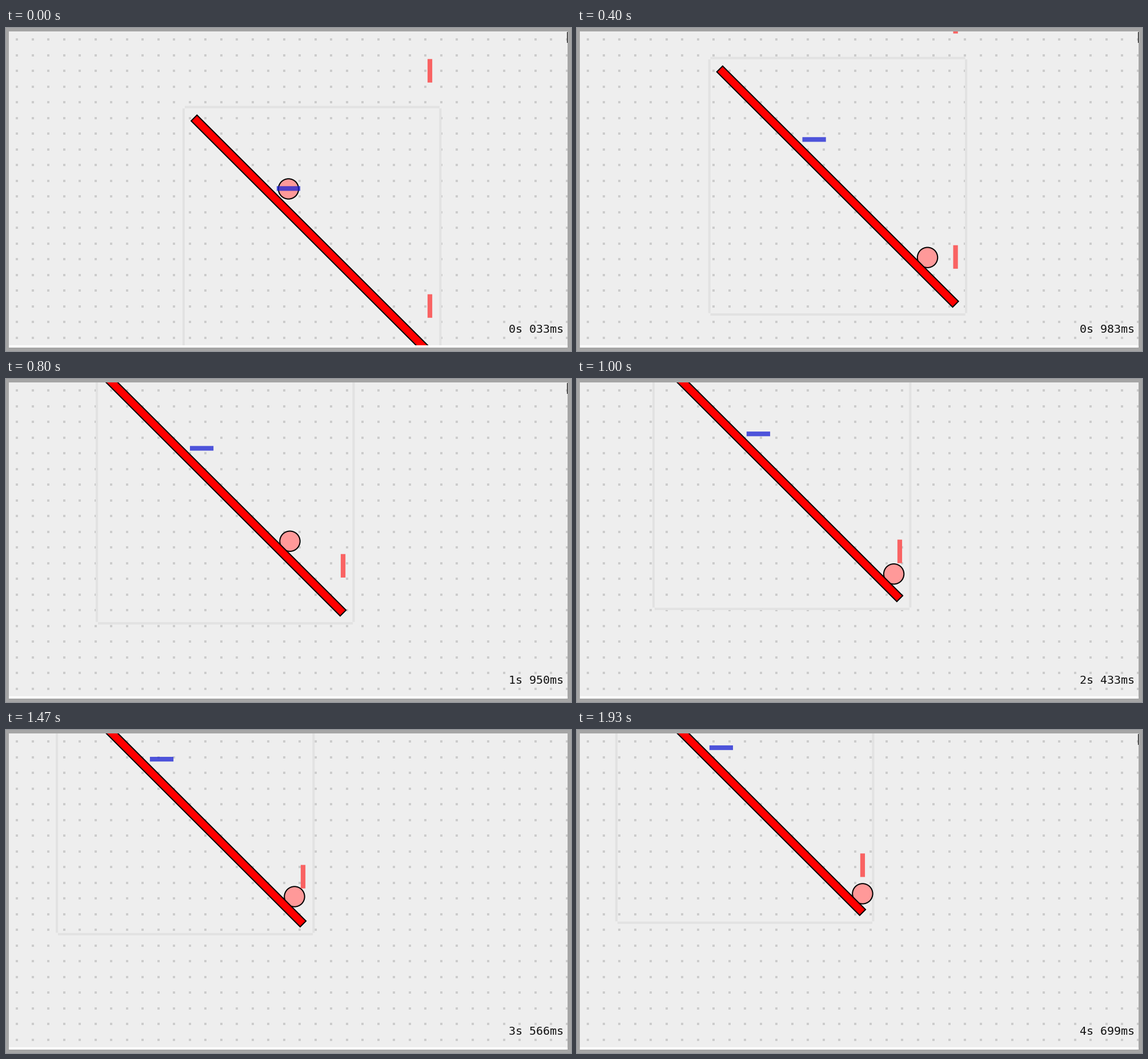
A matplotlib script for the animation above (2 s loop, 989 by 566 pixels).

```python
from math import sqrt

import numpy as np
import matplotlib.pyplot as plt
from matplotlib.animation import FuncAnimation
from matplotlib.patches import Circle, Polygon, Rectangle
from matplotlib.transforms import Affine2D

W, H, DPI = 989, 566, 64
PT = 72 / DPI                 # points per pixel

# Ball physics, in pixels and seconds
START = np.array([494.5, 281.5])
DROP = 8.2                    # free fall before touching the rail
TRAVEL = 247.5                # horizontal distance to the stop
HIT = 1.096                   # time of the first bounce
BOUNCE = 0.627
FOLLOW = 0.0295               # camera smoothing per tick
TICKS = 282

ACC = (2 * TRAVEL + DROP) / HIT**2
LAND = sqrt(DROP / ACC)


def roll(t):
    """Horizontal distance rolled along the rail."""
    if t < LAND:
        return 0.0
    if t < HIT:
        return (ACC * t * t - DROP) / 2
    t -= HIT
    speed = ACC * HIT * BOUNCE
    while speed > 1 and t > 2 * speed / ACC:
        t -= 2 * speed / ACC
        speed *= BOUNCE
    if speed <= 1:
        return TRAVEL
    return TRAVEL - speed * t + ACC * t * t / 2


def simulate():
    balls, cams = [], []
    cam = np.zeros(2)
    for n in range(TICKS + 1):
        t = n / 60
        x = roll(t)
        ball = np.array([x, x + min(DROP, ACC * t * t)])
        cam = cam + FOLLOW * (ball - cam)
        balls.append(START + ball)
        cams.append(cam)
    return balls, cams


balls, cams = simulate()

fig = plt.figure(figsize=(W / DPI, H / DPI), dpi=DPI, facecolor="#eeeeee")
ax = fig.add_axes([0, 0, 1, 1])
ax.set_xlim(0, W)
ax.set_ylim(H, 0)
ax.axis("off")

camera = Affine2D()
world = camera + ax.transData


def box(x0, y0, x1, y1, color, z, **kw):
    patch = Rectangle((x0, y0), x1 - x0, y1 - y0, fc=color, lw=0, zorder=z, **kw)
    return ax.add_patch(patch)


def moving_box(x0, y0, x1, y1, color, z, **kw):
    return box(x0, y0, x1, y1, color, z, transform=world, snap=False, **kw)


# Dotted grid
gx, gy = np.meshgrid(19 + 27.5 * np.arange(36), 20 + 27.5 * np.arange(20))
ax.plot(gx.ravel(), gy.ravel(), ls="", marker="s", ms=3.7 * PT, mew=0,
        color="#cccccc", zorder=1)

# Room walls
for x in (309, 758.4):
    moving_box(x, 141, x + 4, 585.5, "#e2e2e2", 2)
for y in (136.6, 586):
    moving_box(313, y, 759, y + 4, "#e2e2e2", 2)

ball = Circle(START, 17.7, fc="#ff9999", ec="black", lw=2 * PT,
              transform=world, zorder=3)
ax.add_patch(ball)

# Rail
a, b = np.array([329.2, 157.7]), np.array([742, 570])
side = np.array([5.1, -5.1])
ax.add_patch(Polygon([a + side, b + side, b - side, a - side], fc="red",
                     ec="black", lw=2 * PT, joinstyle="miter",
                     transform=world, zorder=4))

# Start and end markers
moving_box(473.9, 277.2, 515.1, 285.4, (0.09, 0.12, 0.83), 5, alpha=0.75)
for y in (54.4, 466.6):
    moving_box(737.9, y, 746.1, y + 41.2, "#f96363", 5)

clock = ax.text(976.3, 534, "", ha="right", va="baseline", color="#111111",
                family="DejaVu Sans Mono", size=20 * PT, zorder=6)
caret = box(982, 7, 983, 26, "black", 6)

# Window frame
box(0, 556, W, 560, "white", 7)
for edge in ((0, 0, W, 6), (0, 0, 5, H), (983, 0, W, H), (0, 560, W, H)):
    box(*edge, "#a5a5a5", 8)


def draw(k):
    step = (3 * k + 2) // 20
    n = 2 + TICKS * step // 29 if step == 0 else 2 + (TICKS - 2) * step // 29
    t = n / 60
    ball.center = tuple(balls[n])
    camera.clear().translate(*-cams[n])
    ms = int(n * 1000 / 60 - max(0, n - 150) * 1e-9)
    clock.set_text(f"{ms // 1000}s {ms % 1000:03d}ms")
    caret.set_visible((t - 0.18) // 0.5 % 2 == 1)
    return ball, clock, caret


anim = FuncAnimation(fig, draw, frames=200, interval=10, repeat=True,
                     repeat_delay=0)
plt.show()
```
